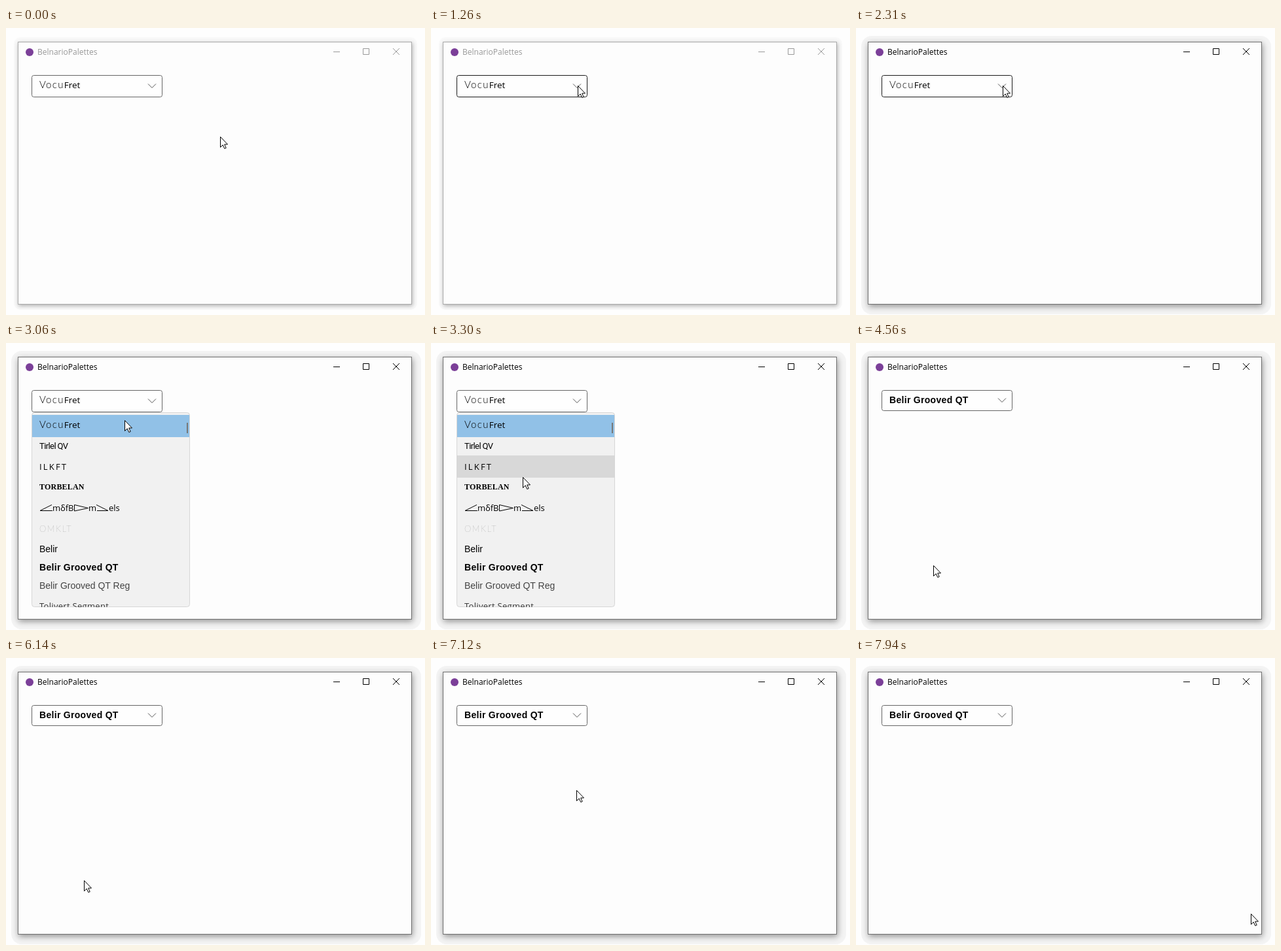
Animation, 640 px wide and 439 px high, one loop 7990 ms. Source, as an HTML page:

```html
<!DOCTYPE html>
<html lang="en">
<head>
<meta charset="utf-8">
<title>Font picker</title>
<style>
  html, body { margin: 0; width: 100%; height: 100%; overflow: hidden; background: #fefefe; }
  .stage { position: relative; width: 640px; height: 439px; overflow: hidden; }
  .halo { position: absolute; left: 12px; top: 14px; width: 616px; height: 417px; border-radius: 10px; background: #f9f9f9; }
  .window { position: absolute; left: 18px; top: 21px; width: 600px; height: 400px; border: 1px solid #aaa; background: #fdfdfd; box-shadow: 1px 2px 6px rgba(0, 0, 0, .3); }
  .active .halo { left: 8px; top: 12px; width: 626px; height: 426px; border-radius: 16px; background: #f4f4f4; }
  .active .window { border-color: #707070; box-shadow: 1px 3px 9px rgba(0, 0, 0, .4); }
  svg { position: absolute; left: 0; top: 0; }
  text { white-space: pre; }
  .line { fill: none; stroke: currentColor; }
  .bar { color: #999; }
  .active .bar { color: #000; }
  .title { font: 12px "Open Sans", sans-serif; fill: currentColor; }
  .box { fill: #fefefe; stroke: #666; }
  .hot .box { stroke: #1a1a1a; }
  .chevron { color: #555; }
  .thin { font: 300 15px Lato, sans-serif; letter-spacing: 1.3px; }
  .plain { font: 13.5px "Open Sans", sans-serif; letter-spacing: 0; }
  .narrow { font: 13px Roboto, sans-serif; letter-spacing: -.6px; }
  .spaced { font: 13px "Open Sans", sans-serif; letter-spacing: 2.2px; }
  .fancy { font: bold 12px "Liberation Serif", serif; letter-spacing: .2px; }
  .symbol { font: 13px "Open Sans", sans-serif; }
  .hairline { font: 100 13px Lato, sans-serif; letter-spacing: 1.6px; fill: #666; }
  .sans { font: 14px "Liberation Sans", sans-serif; }
  .heavy { font: bold 14px "Liberation Sans", sans-serif; letter-spacing: .3px; }
  .soft { fill: #444; }
  .airy { font: 13px "Open Sans", sans-serif; letter-spacing: .3px; fill: #333; }
</style>
</head>
<body>
<div class="stage" id="stage">
  <div class="halo"></div>
  <div class="window"></div>
  <svg width="640" height="439" viewBox="0 0 640 439">
    <defs>
      <clipPath id="listClip"><rect x="40" y="107" width="240" height="297"/></clipPath>
      <text id="firstName" class="thin" x="51">Vocu<tspan class="plain">Fret</tspan></text>
      <text id="chosenName" class="heavy" x="51">Belir Grooved QT</text>
    </defs>

    <g class="bar">
      <circle cx="36" cy="37" r="6" fill="#7b3f98"/>
      <text class="title" x="48" y="41">BelnarioPalettes</text>
      <path class="line" d="M500 36.5h10M545.5 31.5h9v9h-9z"/>
      <path class="line" d="M591 31l10 10M601 31l-10 10"/>
    </g>

    <rect class="box" id="box" x="39.5" y="72.5" width="199" height="33" rx="3"/>
    <use id="before" href="#firstName" y="92"/>
    <use id="after" href="#chosenName" y="92"/>
    <path class="line chevron" id="chevron" d="M217 85.5l6 6 6-6"/>

    <g id="popup">
      <rect x="39.5" y="106.5" width="241" height="297" rx="4" fill="#f1f1f1" stroke="#d6d6d6"/>
      <g clip-path="url(#listClip)">
        <rect x="40" y="110" width="240" height="34" fill="#91c1e7"/>
        <rect id="hover" x="40" width="240"/>
        <use href="#firstName" y="130"/>
        <text class="narrow" x="51" y="162">Tirlel QV</text>
        <text class="spaced" x="51" y="194">ILKFT</text>
        <text class="fancy" x="51" y="224">TORBELAN</text>
        <g class="symbol">
          <path class="line" d="M70 247.5L52 256.5h19M104.5 247.5v9.5l21-4.5zM138 247.5l18 9h-17"/>
          <text x="71" y="257">mδfB</text>
          <text x="126" y="257">m</text>
          <text x="157" y="257">els</text>
        </g>
        <text class="hairline" x="51" y="289">OMKLT</text>
        <text class="sans" x="51" y="320">Belir</text>
        <use href="#chosenName" y="348"/>
        <text class="sans soft" x="51" y="376">Belir Grooved QT Reg</text>
        <text class="airy" x="51" y="407">Tolivert Segment</text>
        <rect x="276" y="122" width="2" height="16" fill="#777"/>
      </g>
    </g>

    <path id="cursor" d="M.5.5V16.5L4.2 12.9 6.8 18.5 9.2 17.5 6.7 12H11.5Z" fill="#fff" stroke="#000"/>
  </svg>
</div>
<script>
  const LOOP = 7990, ACTIVATE = 2310, OPEN = 2570, PRESS = 4370, CLOSE = 4500;
  const rowTops = [110, 144, 172, 206, 235, 268, 302, 330, 358, 386, 414];

  // Each move advances one step per gap; via lists [step, x, y].
  const moves = [
    { at: 500, gap: 58.4, via: [[0, 327, 166], [14, 224, 88]] },
    { at: 2930, gap: 62.8, via: [[0, 224, 88], [3, 181, 118], [10, 108, 319], [13, 115, 335], [16, 117, 340]] },
    { at: 4560, gap: 60, via: [[0, 117, 340], [1, 118, 340]] },
    { at: 6140, gap: 60, via: [[0, 118, 340], [1, 119, 340], [3, 121, 337]] },
    { at: 6660, gap: 58.1, via: [[0, 121, 337], [11, 278, 172], [14, 342, 187], [23, 603, 391]] }
  ];
  const el = Object.fromEntries([...document.querySelectorAll("[id]")].map(e => [e.id, e]));
  const show = (e, on) => e.setAttribute("visibility", on ? "visible" : "hidden");

  const slope = (via, i, axis) =>
    i < 0 || i >= via.length - 1 ? 0 : (via[i + 1][axis] - via[i][axis]) / (via[i + 1][0] - via[i][0]);

  // Harmonic mean keeps the curve from overshooting its points.
  function tangent(via, i, axis) {
    const a = slope(via, i - 1, axis), b = slope(via, i, axis);
    return a * b <= 0 ? 0 : 2 * a * b / (a + b);
  }

  function along(via, step, axis) {
    let i = 0;
    while (i < via.length - 2 && step > via[i + 1][0]) i++;
    const span = via[i + 1][0] - via[i][0], u = (step - via[i][0]) / span;
    const ease = u * u * (3 - 2 * u);
    return Math.round(via[i][axis] * (1 - ease) + via[i + 1][axis] * ease
      + span * u * (1 - u) * ((1 - u) * tangent(via, i, axis) - u * tangent(via, i + 1, axis)));
  }

  function cursorAt(t) {
    const { at, gap, via } = moves.findLast(m => t >= m.at) || moves[0];
    const step = Math.max(0, Math.min(via.at(-1)[0], Math.floor((t - at) / gap) + 1));
    return [along(via, step, 1), along(via, step, 2)];
  }

  function draw(t) {
    const [x, y] = cursorAt(t);
    const open = t >= OPEN && t < CLOSE, chosen = t >= CLOSE;
    const row = rowTops.findLastIndex(top => y >= top);

    el.cursor.setAttribute("transform", `translate(${x} ${y})`);
    el.stage.classList.toggle("active", t >= ACTIVATE);
    el.stage.classList.toggle("hot", t < OPEN && x < 239 && y < 106);
    el.box.setAttribute("height", chosen ? 31 : 33);
    el.chevron.setAttribute("transform", `translate(0 ${chosen ? -1 : 0})`);
    show(el.before, !chosen);
    show(el.after, chosen);
    show(el.popup, open);
    show(el.hover, open && row > 0);
    if (row > 0 && row < rowTops.length - 1) {
      el.hover.setAttribute("y", rowTops[row]);
      el.hover.setAttribute("height", rowTops[row + 1] - rowTops[row]);
      el.hover.setAttribute("fill", t >= PRESS ? "#c1c1c1" : "#d8d8d8");
    }
  }

  const start = performance.now();
  function tick() {
    draw((performance.now() - start) % LOOP);
    requestAnimationFrame(tick);
  }
  tick();
</script>
</body>
</html>
```
